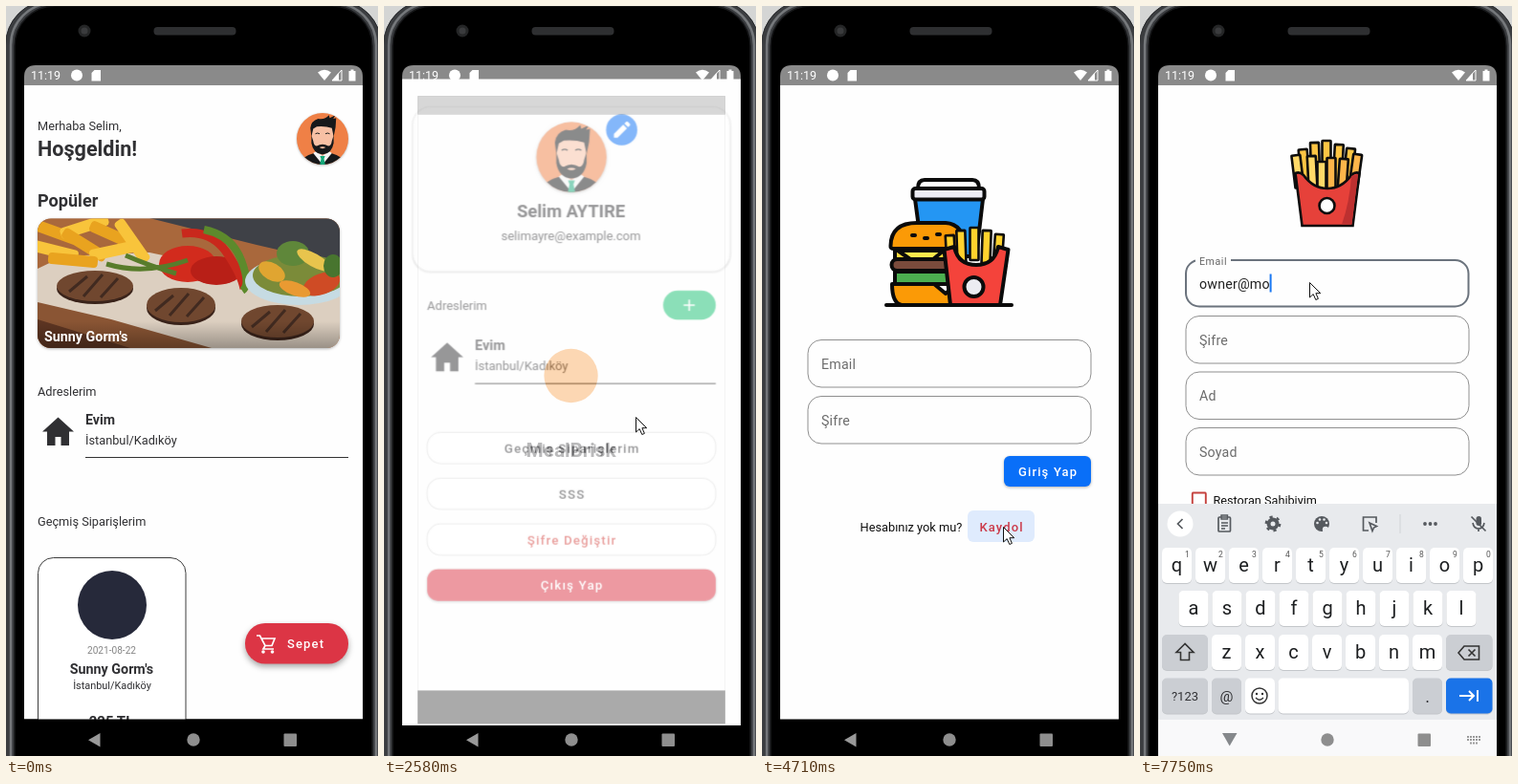
Animation of 389x785 px, one loop 8000 ms. Source, as an HTML page:

```html
<!DOCTYPE html>
<html lang="tr">
<head>
<meta charset="utf-8">
<style>
  html, body { margin: 0; width: 389px; height: 785px; overflow: hidden; background: #000; }
  svg { display: block; font-family: Roboto, sans-serif; }
  text { white-space: pre; }
  .lift { filter: drop-shadow(0 1.5px 1.5px rgba(0,0,0,.3)); }
</style>
</head>
<body>
<svg id="stage" width="389" height="785" viewBox="0 0 389 785"></svg>
<script>
const INK = '#303033', RED = '#dc3545', LOOP = 8000;

// Markup helpers
const txt = (x, y, s, size = 12.75, o = {}) =>
  `<text x="${x}" y="${y}" font-size="${size}" fill="${o.fill || INK}" font-weight="${o.w || 400}"
    text-anchor="${o.mid ? 'middle' : 'start'}" letter-spacing="${o.ls || 0}">${s}</text>`;
const box = (x, y, w, h, r, fill, more = '') =>
  `<rect x="${x}" y="${y}" width="${w}" height="${h}" rx="${r}" fill="${fill}" ${more}/>`;
const dot = (x, y, r, fill, more = '') => `<circle cx="${x}" cy="${y}" r="${r}" fill="${fill}" ${more}/>`;
const oval = (x, y, rx, ry, fill, turn = 0) =>
  `<ellipse cx="${x}" cy="${y}" rx="${rx}" ry="${ry}" fill="${fill}" transform="rotate(${turn} ${x} ${y})"/>`;
const path = (d, fill = 'none', more = '') => `<path d="${d}" fill="${fill}" ${more}/>`;
const line = (color, w = 1) => `stroke="${color}" stroke-width="${w}"`;
const group = (id, inner, more = '') => `<g id="${id}" ${more}>${inner}</g>`;
const at = (x, y, inner, s = 1) => `<g transform="translate(${x} ${y}) scale(${s})">${inner}</g>`;
const caps = (x, y, s, fill) => txt(x, y, s, 13, { fill, w: 500, mid: 1, ls: 1.16 });
const button = (x, y, w, h, r, fill, label) =>
  box(x, y, w, h, r, fill, 'class="lift"') + caps(x + w / 2 + .6, y + h / 2 + 4.7, label, '#fff');
const pill = (y, label, fill = INK) =>
  box(48, y, 296, 32, 14, '#fff', line('#dcdcdc')) + caps(196.6, y + 21, label, fill);
const field = (y, label) =>
  box(48, y, 296, 49.5, 14, '#fefefe', line('#8f8f8f')) + txt(62, y + 30, label, 14.2, { fill: '#6c6c6c', ls: .2 });
const page = box(19, 83, 354, 663.5, 0, '#fefefe');

const address = end =>
  path('M54.5 430.5L71 445.5H66V460H57.5V451H51.5V460H43V445.5H38z', INK) +
  txt(83, 438, 'Evim', 14.2, { w: 700 }) + txt(83, 459, 'İstanbul/Kadıköy') +
  path(`M83 472.5H${end}`, 'none', line('#333', 1.2));

const BLACK = '#17181a';
const avatar = dot(0, 0, 36, '#ef8046', 'class="lift"') + `<g clip-path="url(#face)">` +
  path('M-31 36Q-29 24-12 20H12Q29 24 31 36z', BLACK) +
  path('M-13 20L-7 16H7L13 20L0 36z', '#f5f5f5') +
  path('M-7 12H7V19L0 24L-7 19z', '#eaa98c') +
  path('M-3.5 24H3.5L2 28L4 37H-4L-2 28z', '#16a97a') +
  path('M-15-17Q0-23 15-17V5Q12 19 0 20Q-12 19-15 5z', '#f8c0a4') +
  path('M-15.5-5L-13 3Q-12 10-8 10Q0 5 8 10Q12 10 13 3L15.5-5V6Q13 21 0 22Q-13 21-15.5 6z', BLACK) +
  path('M-4.5 12Q0 10 4.500 12Q0 15-4.500 12z', '#f8c0a4') +
  path('M-10-7Q-7-9-4-7M4-7Q7-9 10-7', 'none', line(BLACK, 1.3)) +
  path('M-15.5-3L-17-15Q-16-25-6-28Q3-26 9-33L10-29L18-33L15-28L19-29Q19-16 15.5-3L13-15Q4-18-8-17L-13-14z', BLACK) +
  '</g>';

const photo = `<g clip-path="url(#photo)">` +
  box(33, 222, 316, 136, 0, '#a9683c') + path('M150 222H349V270L262 250z', '#3f4147') +
  path('M33 275L60 262L150 258L349 300V358H33z', '#dccfc0') +
  path('M33 310L110 328L215 358H33z', '#8a5534') + path('M33 328L130 358H33z', '#5d3522') +
  [[50, 236, 20], [82, 231, -18], [112, 240, 24], [50, 256, 14], [82, 250, 32], [113, 256, -12], [70, 266, 5], [132, 246, 55]]
    .map(([x, y, a], i) => box(x - 26, y - 6, 52, 12, 4, i % 2 ? '#f8c43b' : '#e9a31f', `transform="rotate(${a} ${x} ${y})"`)).join('') +
  oval(190, 270, 30, 19, '#d22b1d') + oval(220, 277, 27, 15, '#b81f17') +
  path('M184 238Q214 234 230 257T249 296', 'none', line('#c9281c', 9)) +
  path('M207 234Q236 240 246 266T247 298', 'none', line('#5d8a2c', 8)) +
  path('M105 270Q145 282 190 266M125 261Q150 272 178 280', 'none', line('#587c2b', 5)) +
  oval(306, 288, 56, 25, '#c6dbe3') + oval(308, 282, 50, 22, '#7b8b39') +
  oval(278, 278, 15, 9, '#e0a531', 30) + oval(300, 259, 17, 13, '#5f873a') + oval(330, 291, 20, 11, '#cf4b25', -20) +
  oval(322, 266, 20, 7, '#e8c44d', 30) + oval(302, 296, 17, 7, '#e99a32', 20) + oval(342, 272, 10, 12, '#48752f') +
  [[93, 293, 40, 16], [183, 313, 36, 18], [284, 330, 38, 17]].map(([x, y, w, h]) =>
    oval(x, y + 3, w, h, '#3a231a') + oval(x, y, w, h, '#70472f') +
    path(`M${x - 27} ${y + 6}l19-16m-4 21l20-23m-2 24l18-20`, 'none', line('#412a20', 3))).join('') +
  box(33, 330, 316, 28, 0, 'url(#shade)') + '</g>';

const cart = path('M262 659h3.5l5.5 10.5h7l3-7.5h-13.5M271 669.5l-2 3.5h11', 'none', line('#fff', 1.7)) +
  dot(269, 676, 1.8, '#fff') + dot(278.5, 676, 1.8, '#fff');

const home = page +
  txt(33, 130, 'Merhaba Selim,') + txt(33, 157, 'Hoşgeldin!', 21.6, { w: 700 }) + at(331, 139, avatar, .75) +
  txt(33, 210, 'Popüler', 18.1, { w: 700 }) +
  box(33, 222.5, 316, 135.5, 14, '#b98', 'class="lift"') + photo +
  txt(40, 351, "Sunny Gorm's", 14.3, { fill: '#fff', w: 700 }) +
  txt(33, 408, 'Adreslerim') + address(358) + txt(33, 544, 'Geçmiş Siparişlerim') +
  box(33.5, 577.5, 154.5, 200, 16, '#fff', line('#3c3c3c')) + dot(111, 627, 36, '#26293a') +
  txt(110.5, 677.5, '2021-08-22', 10.1, { fill: '#858585', mid: 1 }) +
  txt(110.5, 699, "Sunny Gorm's", 14.3, { w: 700, mid: 1 }) +
  txt(111, 715, 'İstanbul/Kadıköy', 10.9, { mid: 1 }) + txt(110, 754, '225 TL', 15, { w: 700, mid: 1 }) +
  box(250, 646, 108, 42.5, 21, RED, 'style="filter:drop-shadow(0 3px 3px rgba(0,0,0,.35))"') + cart +
  caps(313.6, 672, 'Sepet', '#fff') + box(19, 746.5, 354, 39, 0, '#000');

const profile =
  box(33.5, 111.5, 325, 168.5, 18, '#fefefe', line('#ececec') + ' style="filter:drop-shadow(0 1px 1px rgba(0,0,0,.2))"') +
  at(196, 163, avatar) + dot(247.5, 135, 16, '#0b70f6') +
  path('M239.5 143v-3.8l9.6-9.6 3.8 3.8-9.6 9.6zM250.3 128.5l1.8-1.8q.8-.6 1.6 0l2.2 2.2q.6.8 0 1.6l-1.8 1.8z', '#fff') +
  txt(195.5, 225, 'Selim AYTIRE', 18.1, { w: 700, mid: 1 }) + txt(195.5, 248, 'selimayre@example.com', 12.8, { mid: 1 }) +
  txt(48, 320, 'Adreslerim') + box(290, 300, 54, 30, 15, '#18c172') +
  path('M311 315h11.5M316.8 309.3v11.5', 'none', line('#fff', 1.6)) + at(14, -77, address(330)) +
  pill(445.5, 'Geçmiş Siparişlerim') + pill(492.5, 'SSS') + pill(539.5, 'Şifre Değiştir', '#d5403c') +
  button(48, 586, 296, 32.5, 11, RED, 'Çıkış Yap') + box(48, 586, 296, 32.5, 11, '#fff', 'id="press" opacity="0"');

const splashArt = dot(195.5, 384, 31, '#f8891d', 'class="mark"') +
  txt(195.5, 477, 'MealBrisk', 22.8, { w: 700, mid: 1 });

const stick = (x, y, a, h = 40, w = 9, fill = '#fdc544') =>
  box(x - w / 2, y, w, h, .5, fill, `stroke="#0d0d0d" stroke-width="2.6" transform="rotate(${a} ${x} ${y + h})"`);
const bold = inner =>
  `<g stroke="#0b0b0b" stroke-width="4" stroke-linejoin="round" stroke-linecap="round">${inner}</g>`;

const meal = bold(
  path('M160 202H231L224 262H168z', '#2496f3') + box(157.5, 191, 75, 11.5, 3, '#ececf4') +
  path('M163 191Q163 182 170 182H220Q227 182 227 191z', '#fff') +
  path('M139 254H205V268H139z', '#ffd93b') + path('M142 256H190L168 274z', '#ffe94d') +
  box(135.5, 265, 64, 12, 6, '#7a4b3c') + path('M136 291H180L192 301L200 294V313H146Q136 311 136 291z', '#fb9a06') +
  path('M139 278H198V291H139z', '#4caf50') +
  path('M134.5 251Q135 227 162 227H192Q211 228 212 254H138Q134 254 134.5 251z', '#fb9a06') +
  path('M157 240h3M170 243h3M183 239h3')) +
  [[198, 240, -3], [209, 235, -2], [222, 232, 0], [234, 235, 2], [246, 239, 4]].map(([x, y, a]) => stick(x, y, a, 34, 9, '#ffd22e')).join('') +
  bold(path('M190.5 255L201 252Q205 271 224 271T247 252L257.5 255L249 313H197z', '#f4433b') +
  dot(221.5, 294, 10, '#ececf2') + path('M130 313H261'));

const login = page + meal + field(349.5, 'Email') + field(408.5, 'Şifre') +
  button(253, 471, 91, 32, 6, '#096ff8', 'Giriş Yap') +
  box(215, 528, 70, 33, 6, '#dfebfd', 'id="hint"') +
  txt(102.5, 550, 'Hesabınız yok mu?', 12.8, { fill: '#111' }) + caps(250.6, 550, 'Kaydol', '#cb3a4a');

const fries = [[184, 143, -2], [195, 141, 0], [206, 145, 3], [174, 150, -5], [216, 149, 6]].map(([x, y, a]) => stick(x, y, a, 44)).join('') +
  [[167, 156, -7], [223, 155, 8], [181, 157, -3], [211, 160, 4], [190, 163, 0], [200, 159, 0]].map(([x, y, a], i) => stick(x, y, a, 34, 9, i % 2 ? '#fdb54a' : '#ffd968')).join('') +
  path('M162.5 175Q167 173 171 177Q181 191 196 191T221 177Q225 173 229.5 175L222.5 230H169.5z', '#e6413a', line('#0d0d0d', 2.6)) +
  path('M221 178L228 176L221.5 228.5H211Q219 206 221 178z', '#bd3030') + dot(195.5, 209, 8, '#fff', line('#0d0d0d', 2.6));

const register = page + fries + group('idle', field(265.5, 'Email')) +
  group('focus', box(48, 266, 295.5, 48.5, 14, '#fefefe', line('#6b737d', 2)) + box(58, 262, 37, 7, 0, '#fefefe') +
    txt(62, 270.5, 'Email', 10.6, { fill: '#666', ls: .6 }) +
    `<text id="typed" x="62" y="296" font-size="14.2" letter-spacing=".2" fill="#222"></text>` +
    box(61.8, 280.5, 2, 19, 0, '#1877f2', 'id="caret"')) +
  field(324.5, 'Şifre') + field(383, 'Ad') + field(441.5, 'Soyad') +
  box(54.8, 509.5, 14, 14, 1, '#fff', line('#c5423e', 1.9)) + txt(76.5, 521.5, 'Restoran Sahibiyim', 12.7, { fill: '#111' }) +
  button(48, 547, 144, 32.5, 6, '#4a4a4a', 'Vazgeç') + button(199, 547, 145, 32.5, 6, RED, 'Kaydol');

// On-screen keyboard
const key = (x, y, w, fill = '#fff') =>
  box(x, y + 1, w, 37, 5, '#c3c6ca') + box(x, y, w, 37, 5, fill);
const row = (letters, x0, y, digits) => [...letters].map((c, i) => {
  const x = x0 + 35 * i;
  return key(x - 15.5, y, 31) + txt(x, y + 25, c, 20, { fill: '#1d1f21', mid: 1 }) +
    (digits ? txt(x + 11, y + 10, (i + 1) % 10, 8.5, { fill: '#555', mid: 1 }) : '');
}).join('');
const GREY = '#cbced3', ICON = '#565a5f', pen = line(ICON, 1.7);
const tools = path('M44.5 537L39.5 542L44.5 547', 'none', pen) +
  box(82, 535, 12.5, 15, 1, 'none', pen) + path('M85 533h6.5v4H85zM85 541h7M85 544h7M85 547h4', 'none', line(ICON, 1.4)) +
  dot(139, 542, 4.5, 'none', line(ICON, 4)) + dot(139, 542, 7.2, 'none', line(ICON, 2.4) + ' stroke-dasharray="3.2 4.34"') +
  oval(190, 542, 8, 8, ICON) + [[185.5, 541], [188, 537.5], [192.5, 537.5], [195, 541]].map(([x, y]) => dot(x, y, 1.3, '#e8eaed')).join('') +
  dot(194, 548, 3.2, '#e8eaed') +
  path('M247 541V535H233.5V549H239M240 541L247.5 544.5L244.5 546L243 549.5z', 'none', pen) +
  [298, 303.5, 309].map(x => dot(x, 542, 1.9, ICON)).join('');
const keyboard = box(19, 521, 354, 264, 0, '#e8eaed') + dot(42, 542, 13.5, '#fff') +
  group('tools', tools) + group('strip', path('M40 537L45 542L40 547', 'none', pen) +
    '<text id="guess" x="98" y="546" font-size="13.2" text-anchor="middle" fill="#333"></text>') +
  path('M272 532V552', 'none', line('#d0d3d7')) +
  box(351.5, 534, 5.5, 10, 2.7, ICON) + path('M348 541Q349 547 354 547T360 541M354 547V550M346.5 534.5L361.5 549.5', 'none', pen) +
  row('qwertyuiop', 38.5, 567, true) + row('asdfghjkl', 56, 612) + row('zxcvbnm', 90.5, 658) +
  key(23, 658, 48, GREY) + path('M47 667.5L38 676.5H42.5V684.5H51.5V676.5H56z', 'none', line('#333', 1.6)) +
  key(320, 658, 48.5, GREY) + path('M339 670H354.5V684H339L333 677zM343.5 673.5l7 7m0-7l-7 7', 'none', line('#333', 1.6)) +
  key(23, 703.5, 48, GREY) + txt(47, 727, '?123', 13, { mid: 1 }) +
  key(75, 703.5, 31, GREY) + txt(90.5, 728, '@', 15.5, { mid: 1 }) +
  key(110, 703.5, 31) + dot(125, 722, 8, 'none', line('#333', 1.5)) + dot(122, 720, 1.2, '#333') + dot(128, 720, 1.2, '#333') +
  path('M121 724Q125 728.5 129 724', 'none', line('#333', 1.3)) + key(144.5, 703.5, 136.5) +
  key(285, 703.5, 31, GREY) + txt(300.5, 729, '.', 18, { mid: 1 }) + key(320, 703.5, 48.5, '#1a73e8') +
  path('M334 722H349M344 717L349 722L344 727M353 716V728', 'none', line('#fff', 1.9)) +
  box(19, 747, 354, 38, 0, '#f9f9fa');

const status = txt(26, 77, '11:19', 12.5, { fill: '#fff' }) + dot(74, 72.5, 6, '#fff') +
  path('M92.5 67H99V78.5H89.5V70z', '#fff') + path('M326 69.5Q333 64 340 69.5L333 78z', '#fff') +
  path('M351 67V78H341z', 'none', line('#fff')) + path('M348 70V78H341z', '#fff') +
  path('M360.5 66.5h3v1.5h2v10.5h-7V68h2z', '#fff');

document.getElementById('stage').innerHTML = `<defs>
  <clipPath id="screen"><path d="M19 785V74Q19 62 31 62H361Q373 62 373 74V785z"/></clipPath>
  <clipPath id="face"><circle r="36"/></clipPath>
  <clipPath id="photo">${box(33, 222.5, 316, 135.5, 14, '#000')}</clipPath>
  <linearGradient id="shade" x2="0" y2="1"><stop stop-opacity="0"/><stop offset="1" stop-opacity=".3"/></linearGradient>
  </defs>` +
  box(0, 0, 389, 785, 0, '#d4d5d4') + box(-.5, -6, 393, 900, 47, '#3b3d40', line('#25272a')) +
  box(5, -3, 382, 900, 44, 'none', line('#75787b', 2.5)) + box(9, 0, 374, 900, 42, '#000', line('#17181a', 1.5)) +
  dot(82, 26, 6.5, '#252627') + dot(82, 26, 3.5, '#3a3b3d') + box(154.5, 22, 86, 8.5, 4, '#2e2f31') +
  `<g clip-path="url(#screen)">` + box(19, 62, 354, 23, 0, '#8a8a8a') + status + box(19, 746.5, 354, 39, 0, '#000') +
  group('home', home) + group('profile', page + group('details', profile)) +
  group('enter', box(19, 62, 354, 723, 0, '#000') + box(19, 62, 354, 21, 0, '#8a8a8a') + group('late', status) + page + splashArt) +
  group('splash', page + splashArt) + group('login', login) + group('register', register) + group('keys', keyboard) + '</g>' +
  path('M98.5 761V775.5L86 768.2z', '#999', 'id="back"') + path('M86 761H101.5L93.7 774.5z', '#85888b', 'id="down"') +
  dot(196, 768, 6.7, '#8e8e8e') + box(290.5, 761.5, 13.5, 13.5, 1, '#8e8e8e') +
  path('M342 765h14M342 768h14M345 771.5h8', 'none', 'id="kbd" stroke="#999" stroke-width="2" stroke-dasharray="2 1"') +
  group('cursor', path('M.5.5V16L4.2 12.6L6.8 18.5L9.4 17.4L6.9 11.7H11.7z', '#fff', line('#111')));

// Motion
const el = id => document.getElementById(id);
const show = (id, on) => el(id).style.display = on ? '' : 'none';
const fade = (id, v) => el(id).setAttribute('opacity', v);
const part = (t, a, b) => Math.min(1, Math.max(0, (t - a) / (b - a)));
const smooth = k => k * k * (3 - 2 * k);
const zoom = (id, s, cy) => el(id).setAttribute('transform', `translate(196 ${cy}) scale(${s}) translate(-196 ${-cy})`);
const marks = document.querySelectorAll('.mark');

const trail = [
  [870, 352, 235], [1060, 322, 143], [1400, 322, 143], [1660, 223, 480], [1720, 223, 480], [2120, 219, 613],
  [2250, 219, 613], [2560, 262, 431], [2580, 263, 430], [3000, 271, 428], [3300, 271, 428], [3900, 264, 425],
  [4160, 264, 425], [4480, 252, 545], [5020, 252, 545], [5360, 177, 289]];
function pointer(t) {
  if (t >= 130 && t < 200) return [378, 773];
  if (t < 870) return null;
  const i = trail.findIndex(p => p[0] > t);
  if (i < 0) return trail[trail.length - 1].slice(1);
  const [a, x, y] = trail[i - 1], [b, u, v] = trail[i], k = smooth(part(t, a, b));
  return [x + (u - x) * k, y + (v - y) * k];
}

const mail = 'owner@mo', strokes = [6630, 6700, 6830, 6950, 7020, 7220, 7490, 7750];

function draw(t) {
  show('home', t < 1200);
  show('profile', t >= 1200 && t < 2920);
  const k = 1 - (1 - part(t, 2520, 2920)) ** 3;
  zoom('profile', 1 + .05 * k, 415);
  fade('details', 1 - part(t, 2535, 2720));
  show('enter', t >= 2520 && t < 2920);
  zoom('enter', .85 + .15 * k, 417);
  fade('enter', part(t, 2535, 2675));
  fade('late', part(k, .7, 1));
  fade('press', .25 * part(t, 2300, 2380) * (1 - part(t, 2440, 2540)));

  show('splash', t >= 2920 && t < 3970);
  const lift = -36 * Math.sin(Math.PI * part(t, 3180, 3910));
  marks.forEach(m => m.setAttribute('transform', `translate(0 ${lift})`));

  show('login', t >= 3970 && t < 4840);
  fade('hint', part(t, 4540, 4640));
  show('register', t >= 4840);
  show('idle', t < 5450);
  show('focus', t >= 5450);

  const p = part(t, 5560, 5830), rise = 1 - (1 - p) ** 2;
  show('keys', p > 0);
  fade('keys', rise);
  el('keys').setAttribute('transform', `translate(0 ${207 * (1 - rise)})`);
  show('back', p < 1);
  show('down', p === 1);
  fade('kbd', rise);

  const text = mail.slice(0, strokes.filter(s => t >= s).length);
  const suggest = t >= 6630 && t < 7620;
  el('typed').textContent = text;
  el('guess').textContent = text;
  show('strip', suggest);
  show('tools', !suggest);
  el('caret').setAttribute('x', 61.8 + (text ? el('typed').getComputedTextLength() : 0));
  show('caret', t < 5960 || t >= 6490);

  const c = pointer(t);
  show('cursor', c);
  if (c) el('cursor').setAttribute('transform', `translate(${Math.round(c[0])} ${Math.round(c[1])})`);
}

const start = performance.now();
function tick() {
  draw((performance.now() - start) % LOOP);
  requestAnimationFrame(tick);
}
tick();
</script>
</body>
</html>
```
